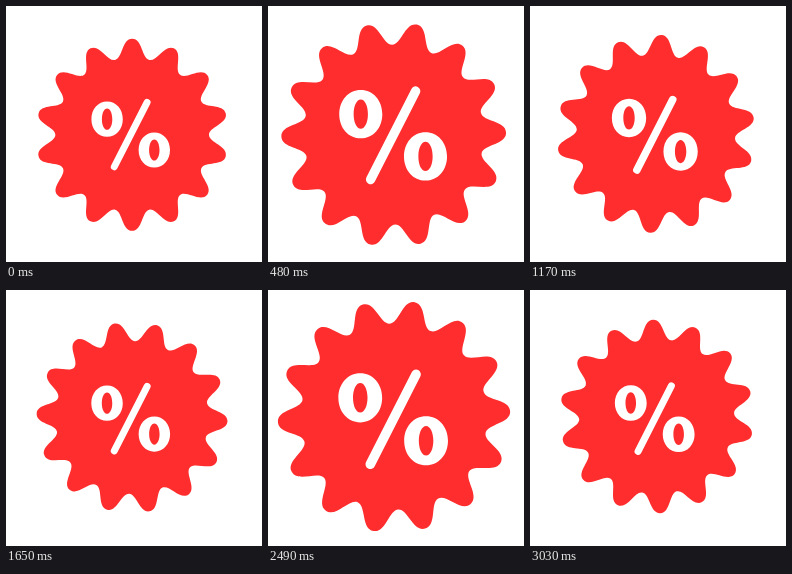
Animation, 256 px wide and 256 px high, one loop 3060 ms. Source, as an HTML page:

```html
<!DOCTYPE html>
<html lang="en">
<head>
<meta charset="utf-8">
<title>Discount badge</title>
<style>
  html, body { margin: 0; width: 100%; height: 100%; overflow: hidden; background: #fff; }
  svg { display: block; width: 100vw; height: 100vh; }
</style>
</head>
<body>
<svg viewBox="0 0 256 256">
  <path id="badge" fill="#ff2d2d"/>
  <g id="percent">
    <path id="zeros" fill="#fff" fill-rule="evenodd"/>
    <path d="M16.4 -32.2L-16.4 32.2" stroke="#fff" stroke-width="6.9" stroke-linecap="round"/>
  </g>
</svg>
<script>
const LOOP = 3060, STEP = 30, PETALS = 14;
const SPIN = 0.02475; // degrees per ms
const badge = document.getElementById('badge');
const percent = document.getElementById('percent');

const linear = x => x;
const easeOut = x => 1 - (1 - x) ** 1.45;
const easeIn = power => x => x ** power;

// Each stop: time in ms, value, easing used on the way to that value.
const radiusStops = [[0, 96], [540, 114.4, linear], [1575, 93.8, easeOut], [2430, 118.4, easeIn(1.1)], [LOOP, 95.8, linear]];
const widthStops = [[0, 79], [540, 112, linear], [1575, 77.5, easeOut], [2430, 113.5, easeIn(1.25)], [LOOP, 78.5, linear]];

function valueAt(stops, t) {
  const i = Math.max(1, stops.findIndex(stop => stop[0] >= t));
  const [t0, from] = stops[i - 1], [t1, to, ease] = stops[i];
  return from + (to - from) * ease((t - t0) / (t1 - t0));
}

// Wavy outline with tips at radius 100: smooth curves from tip to valley and back.
function burstPath() {
  const half = Math.PI / PETALS;
  const at = (k, shift) => {
    const tip = k % 2 === 0;
    const r = tip ? 100 : 80, h = shift * (tip ? 10.8 : 8.2), a = k * half;
    const x = r * Math.sin(a) + h * Math.cos(a);
    const y = -r * Math.cos(a) + h * Math.sin(a);
    return x.toFixed(2) + ' ' + y.toFixed(2);
  };
  let d = 'M' + at(0, 0);
  for (let k = 0; k < PETALS * 2; k++) d += `C${at(k, 1)} ${at(k + 1, -1)} ${at(k + 1, 0)}`;
  return d + 'Z';
}

function oval(cx, cy, rx, ry) {
  const u = rx * 0.57, v = ry * 0.57;
  return `M${cx} ${cy - ry}c${u} 0 ${rx} ${ry - v} ${rx} ${ry}s${u - rx} ${ry} ${-rx} ${ry}` +
    `s${-rx} ${v - ry} ${-rx} ${-ry}s${rx - u} ${-ry} ${rx} ${-ry}Z`;
}

const zero = (cx, cy) => oval(cx, cy, 15.7, 17.6) + oval(cx, cy, 5.2, 10.6);

badge.setAttribute('d', burstPath());
document.getElementById('zeros').setAttribute('d', zero(-23.6, -15.4) + zero(23.6, 15.4));

function render(time) {
  const t = Math.floor((time % LOOP) / STEP) * STEP;
  // The outline sits slightly off the pivot, so it wobbles as it turns.
  badge.setAttribute('transform',
    `translate(128 128) rotate(${t * SPIN}) scale(${valueAt(radiusStops, t) / 100}) translate(-1.9 .9)`);
  const s = valueAt(widthStops, t) / 79;
  percent.setAttribute('transform',
    `translate(${124.7 + (s - 1) * 1.2} ${128.6 + (s - 1) * 1.8}) scale(${s})`);
}

const start = performance.now();
function tick() {
  render(performance.now() - start);
  requestAnimationFrame(tick);
}
tick();
</script>
</body>
</html>
```
